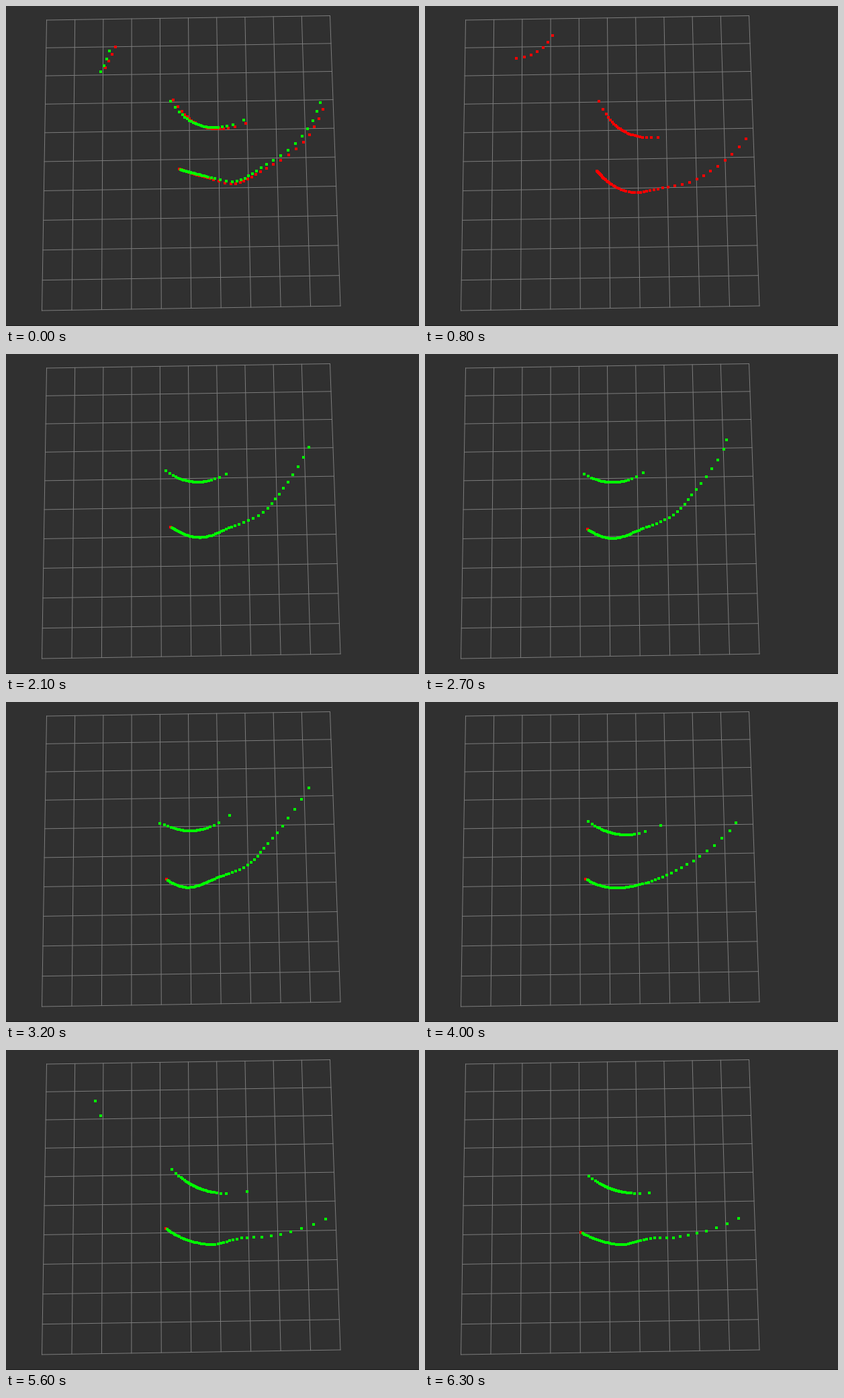
Recreate the animation shown at these times as a matplotlib script. Size 615 by 477 pixels, loop 6.5 s.

```python
import numpy as np
import matplotlib.pyplot as plt
from matplotlib.animation import FuncAnimation

W, H, DPI = 615, 477, 64
PX = 72 / DPI                      # one pixel in points
STEP_MS, FRAMES = 100, 65
HOLDS = {500, 1700, 2500, 3300, 4100, 6400}

# Scanner: 120 beams over a full turn, seen from slightly above
ORIGIN = np.array([273.2, 228.4])
BEAM = np.radians(360 / 119)
BEAMS = np.linspace(-np.pi, np.pi, 120) + np.radians(0.85)


def pts(*xy):
    return np.array(xy, float).reshape(-1, 2)


# Few key points per wall, at the times (ms) where the robot changes its turn
near = {0: pts(258, 243, 305, 257.5, 338, 265.5, 380, 246, 443, 203, 472, 154),
        800: pts(256, 246, 308, 278, 354, 271, 396, 262, 437, 238, 478, 198),
        2100: pts(245, 257.5, 291, 273.5, 333, 259, 384, 235, 413, 200, 452, 138),
        3200: pts(238, 264, 265, 276, 320, 260, 360, 243, 391, 210, 451, 127),
        4700: pts(240, 263, 271, 275.5, 325, 282, 363, 270, 409, 258.5, 474, 230),
        5600: pts(238, 266, 262, 280, 307, 290, 347, 281, 396, 277, 477, 252),
        6300: pts(231, 271, 254, 282, 297, 290, 331, 281.5, 370, 279.5, 467, 251)}

far = {0: pts(250, 140, 285, 176, 359, 174),
       800: pts(260, 142, 290, 183, 348, 196),
       2100: pts(238, 174, 278, 190.5, 328, 179),
       3200: pts(230, 180, 272, 192, 338, 165),
       4700: pts(252, 173, 289, 199.5, 361, 200.5),
       5600: pts(247, 178, 285, 205, 364, 210),
       6300: pts(244, 188, 277, 207, 334, 212.5)}

# Short stretch in the upper left corner, seen twice
corner = {0: pts(163, 61, 156, 77, 148, 92),
          800: pts(190, 44, 167, 68, 135, 78),
          1800: pts(138, 77, 131, 86, 124, 97)}
glimpse = pts(133, 76, 137, 87.5, 141, 99)
corner_late = {4900: glimpse + (4, 8), 5600: glimpse, 5900: glimpse - (2, 3)}

WALLS = [near, far, corner, corner_late]


def key_points(keys, t):
    """Key points at time t, or None while the wall is out of sight."""
    times = sorted(keys)
    if not times[0] <= t <= times[-1]:
        return None
    i = min(np.searchsorted(times, t, side="right"), len(times) - 1)
    a, b = times[i - 1], times[i]
    return keys[a] + (keys[b] - keys[a]) * (t - a) / (b - a)


def smooth(p, n=60):
    """Hermite curve through the points, n samples per span."""
    s = np.r_[0, np.cumsum(np.hypot(*np.diff(p, axis=0).T))]
    m = np.gradient(p, s, axis=0, edge_order=2)
    u = np.linspace(0, 1, n)[:, None]
    spans = []
    for i, h in enumerate(np.diff(s)):
        spans.append((1 + 2 * u) * (1 - u) ** 2 * p[i] + u * (1 - u) ** 2 * h * m[i]
                     + u ** 2 * (3 - 2 * u) * p[i + 1] - u ** 2 * (1 - u) * h * m[i + 1])
    return np.vstack(spans)


def scan(p, turn):
    """Points where the beams hit a wall that is turned about the scanner."""
    x, y = (smooth(p) - ORIGIN).T
    angle, dist = np.arctan2(-y, x) + turn, np.hypot(x, y)
    order = np.argsort(angle)
    angle, dist = angle[order], dist[order]
    slack = 0.5 * BEAM
    a = BEAMS[(BEAMS > angle[0] - slack) & (BEAMS < angle[-1] + slack)]
    r = np.interp(a, angle, dist)
    return ORIGIN + np.column_stack([r * np.cos(a), -r * np.sin(a)])


def cloud(t, turn=0.0):
    walls = (key_points(keys, t) for keys in WALLS)
    return np.vstack([scan(p, turn) for p in walls if p is not None])


fig = plt.figure(figsize=(W / DPI, H / DPI), dpi=DPI, facecolor="#303030")
ax = fig.add_axes([0, 0, 1, 1])
ax.set_xlim(0, W)
ax.set_ylim(H, 0)
ax.axis("off")


def draw_grid():
    tl, tr, bl, br = pts(60.5, 21, 482.5, 14.5, 53.5, 454, 498, 447)
    style = dict(color="#7c7c7c", lw=PX, snap=False, zorder=1)
    for s in np.linspace(0, 1, 11):
        d = s / (s + (1 - s) * 1.053)       # rows widen towards the viewer
        for p, q in ((tl + (tr - tl) * s, bl + (br - bl) * s),
                     (tl + (bl - tl) * d, tr + (br - tr) * d)):
            ax.plot([p[0], q[0]], [p[1], q[1]], **style)
    ax.plot([0, W], [H - 0.5, H - 0.5], color="#1e1e1e", lw=PX, snap=False)


def dots(color):
    return ax.plot([], [], "s", color=color, ms=4.8 * PX, mew=0, snap=False)[0]


draw_grid()
red, green = dots("#ff0000"), dots("#00ff00")


def update(i):
    t = i * STEP_MS
    if t in HOLDS:
        t -= STEP_MS
    lag = BEAM * max(0, 1 - t / 700)        # green trails by one beam, then catches up
    red.set_data(*cloud(t).T)
    green.set_data(*cloud(t, lag)[1:].T)
    red.set_zorder(4 if 500 < t <= 1200 else 2)
    green.set_zorder(3)
    return red, green


anim = FuncAnimation(fig, update, frames=FRAMES, interval=STEP_MS, repeat=True,
                     repeat_delay=0, init_func=lambda: update(0), blit=False)
plt.show()
```
